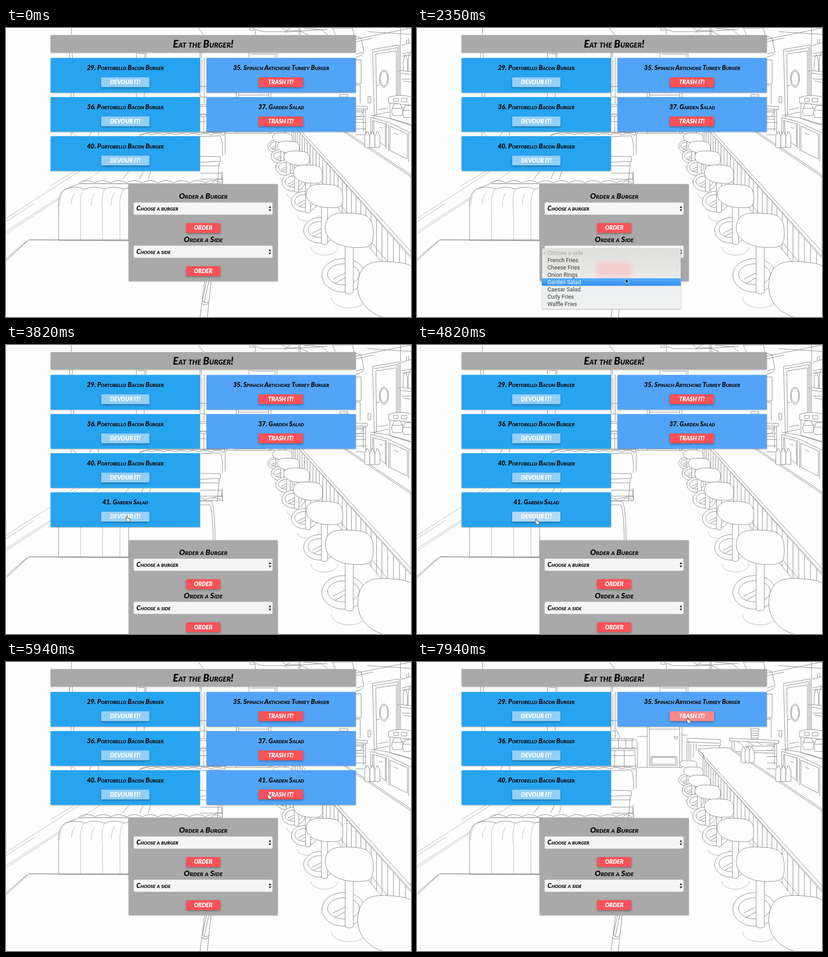
An HTML page that plays this animation: 885 by 633 pixels, repeating every 8000 ms.

```html
<!DOCTYPE html>
<html lang="en">
<head>
<meta charset="utf-8">
<title>Eat the Burger!</title>
<style>
  html, body { margin: 0; width: 100%; height: 100%; overflow: hidden; background: #fefefe; }
  svg { display: block; width: 885px; height: 633px; }
  #scene { fill: none; stroke: #828282; stroke-width: 1; stroke-linejoin: round; }
  #scene .solid { fill: #fefefe; }
  #scene .faint { stroke: #b4b4b4; }
  .hand { font-family: Lato, "Open Sans", sans-serif; font-style: italic; font-weight: 900; font-variant: small-caps; }
  .mid { text-anchor: middle; }
  .menu { font: 12.4px Roboto, Inter, sans-serif; }
  .card { filter: drop-shadow(0 1px 1px rgba(0,0,0,.35)); }
  .button { filter: drop-shadow(0 2px 2px rgba(0,0,0,.35)); }
</style>
</head>
<body>
<svg viewBox="0 0 885 633">
  <defs>
    <linearGradient id="paper" x2="0" y2="1">
      <stop stop-color="#dededc"/><stop offset=".3" stop-color="#e6e6e4"/>
      <stop offset=".65" stop-color="#eeeff0"/><stop offset="1" stop-color="#f0f1f1"/>
    </linearGradient>
    <linearGradient id="pick" x2="0" y2="1">
      <stop stop-color="#55aaf8"/><stop offset="1" stop-color="#3390ee"/>
    </linearGradient>
    <filter id="blur" x="-40%" y="-60%" width="180%" height="220%"><feGaussianBlur stdDeviation="6"/></filter>
  </defs>
  <g id="scene"></g>
  <g id="app"></g>
</svg>
<script>
const LOOP = 8000;
const BLUE = '#27a4f0', SKY = '#52a4f8', RED = '#fb5157', PALE = '#93cff8', GREY = '#a9a9a9';
const scene = document.getElementById('scene'), app = document.getElementById('app');

const path = (d, cls = '') => `<path class="${cls}" d="${d}"/>`;
const rect = (x, y, w, h, fill, extra = '') =>
  `<rect x="${x}" y="${y}" width="${w}" height="${h}" fill="${fill}" ${extra}/>`;
const ellipse = (x, y, rx, ry) => `<ellipse class="solid" cx="${x}" cy="${y}" rx="${rx}" ry="${ry}"/>`;
const text = (x, y, size, str, fill = '#0c0c0c', cls = 'hand mid') =>
  `<text x="${x}" y="${y}" font-size="${size}" fill="${fill}" class="${cls}">${str}</text>`;
const clamp = v => Math.max(0, Math.min(1, v));
const smooth = v => v * v * (3 - 2 * v);

// ---- Diner line drawing ----
function scallops(x0, x1, y, count, rise) {
  const step = (x1 - x0) / count;
  return path(`M${x0} ${y}` + `q${step / 2} ${-rise} ${step} 0`.repeat(count));
}

function stool([x, y, w, h]) {
  const ringX = x - .12 * w, ringY = y + .94 * w, baseY = y + 1.4 * w, post = .085 * w;
  return path(`M${x - .37 * w} ${baseY}a${.37 * w} ${.22 * w} 0 0 0 ${.74 * w} 0`, 'solid faint')
    + ellipse(ringX, ringY, .45 * w, .35 * w)
    + ellipse(ringX, ringY - .02 * w, .33 * w, .22 * w)
    + path(`M${x - post} ${y}V${baseY - .1 * w}q${post} ${.06 * w} ${2 * post} 0V${y}Z`, 'solid')
    + path(`M${x - .34 * w} ${ringY + .08 * w}L${x - post} ${ringY - .05 * w}M${x - .3 * w} ${ringY + .17 * w}L${x - post} ${ringY + .05 * w}`)
    + path(`M${x - w / 2} ${y - .08 * h}C${x - .48 * w} ${y - .55 * h} ${x - .2 * w} ${y - .52 * h} ${x + .12 * w} ${y - .49 * h}`
      + `S${x + .5 * w} ${y - .3 * h} ${x + w / 2} ${y + .12 * h}S${x + .35 * w} ${y + h / 2} ${x + .1 * w} ${y + h / 2}`
      + `S${x - w / 2} ${y + .32 * h} ${x - w / 2} ${y - .08 * h}Z`, 'solid');
}

function bottle(x, y) {
  return path(`M${x} ${y}v-24q1 -4 3 -5l1 -5h3l1 5q3 1 3 5v24q-5 3 -11 0Z`, 'solid');
}

function coffeePot(x, y) {
  return path(`M${x} ${y}l3 -8h13l4 8q5 9 -1 18h-18q-6 -9 -1 -18ZM${x + 20} ${y}q11 2 5 17M${x - 1} ${y + 2}h21`, 'solid');
}

function drawScene() {
  const edge = x => 215 + (x - 630) * 1.12;
  let slats = '';
  for (let x = 629, gap = 4; x < 885; x += gap, gap += .35) {
    slats += `M${x} ${edge(x) + 3}V${edge(x) + 52 + (x - 629) * .18}`;
  }
  const ceiling = path('M143 0V15M139 54V66M145 54V65M285 54V66M289 56H303V65M306 54V65M420 0L432 15M424 54V65M427 54V65'
    + 'M531 54V65M535 57H588V65M592 54V65M533 0V5H545V15M537 0L560 8H610L622 0M603 0L612 6H640L660 15M650 0L690 4L703 15'
    + 'M608 9L702 3M640 0V15M643 0V15M720 15L713 0H757L764 32M764 18L776 22L782 52Q780 61 764 64M765 57L779 53'
    + 'M762 25L885 0M765 30L802 22M790 8L885 14M764 70H776V122H764M764 125H774V166M791 150H797V164H791Z');
  const entrance = path('M424 65V142M428 70V140M433 65V166M424 128H438M424 142V151M503 142V231M508 142V229M574 142V231M579 142V230'
    + 'M511 207H568V227H511ZM514 209H565V224H514ZM482 231H580M508 147H574M560 164H570M482 163H503M579 160H591'
    + 'M142 142V151M148 142V151M285 142V151M302 142V151M142 228V237M145 228L153 237M186 228L182 237M202 228V236')
    + ellipse(566, 166, 3, 3);
  const farBooths = path('M424 168H470Q479 168 481 176L482 232M424 172H475M440 168V190M456 168V190M470 169V190'
    + 'M424 190H478M424 194H476L478 232M432 194V230M453 194V230M424 205H475M424 151H438M438 151L444 168M424 228H480', 'solid')
    + scallops(424, 480, 190, 4, 5);
  const station = path('M590 168L600 167L663 170V183H615M590 168V214M594 172V214M590 175L661 178M598 178V214M604 178V210M610 178V195'
    + 'M661 183V190M729 146H747L745 170H731ZM729 151H747M730 156H746M730 161H746M731 166H745M683 167L790 172V178L684 173Z'
    + 'M688 174V199M693 174V192M781 178V226M786 178V232M718 184H780L775 194H724ZM693 196L781 200M765 181H785M764 207H787M765 221H786'
    + 'M764 194H784M764 234H784M700 174L713 183M722 174L735 183M742 174L755 183', 'solid');
  const doorRight = path('M801 47L859 37V150M801 47L805 198M804 52L856 43V150M808 57L853 50V150M808 57L810 191M804 191L837 184'
    + 'M813 179L835 175M817 125L808 127M855 94H860') + ellipse(826, 111, 10, 19) + ellipse(826, 111, 8, 16);
  const shelves = path('M862 0V150M865 57L885 52M865 62L885 59M862 93L885 96M862 99L885 102M868 93V72L871 60H874L877 72V94M879 95V69L882 55H885'
    + 'M864 38L885 32M875 25V35M880 23V33M865 112H885M868 116L885 119');
  const backBar = path('M797 191L835 197L885 213M797 196L835 206L885 230M797 196V239M801 201V235M831 208V265M836 211V270M880 230V293'
    + 'M803 203L829 210V260L805 240ZM839 215L877 232V287L839 268ZM816 217L823 220M848 230L857 234'
    + 'M836 152Q860 144 885 151M836 152V164L885 169M839 165V198L885 211M847 154H857V161H847ZM864 154H876V162H864Z', 'solid')
    + coffeePot(845, 174) + coffeePot(869, 178);

  const counter = path('M614 191L650 188H684L885 322V500L629 215L625 202Z', 'solid')
    + path('M614 191L885 490M614 191L617 201L885 504M625 204V265M684 191L885 326')
    + path(slats) + path('M628 265L760 422L885 575M634 281L885 593')
    + [708, 717, 726].map(x => bottle(x, 220)).join('') + [784, 795, 806].map(x => bottle(x, 261)).join('');

  const booths = path('M0 417L160 314M0 424L62 384M0 446L205 314M0 451L130 365M97 345L150 314M0 380V410', 'faint')
    + path('M268 314L255 331M300 314L292 331M316 314L311 331M424 238L468 236Q474 246 473 280M424 281L468 282L469 292L424 294'
      + 'M424 302H466M466 293L462 342M472 237L479 232V277M160 341H473L470 315M473 341V314M424 342H448Q456 348 457 430'
      + 'M424 350H445Q452 361 453 430M447 342L460 331H472M290 237L310 229H472M424 331H472M424 318H469')
    + scallops(160, 470, 339, 9, 10) + scallops(292, 474, 234, 7, 6)
    + path('M115 465V402Q112 360 130 353L160 341H268V465Z', 'solid')
    + scallops(130, 300, 353, 4, 9)
    + path('M130 353Q118 362 117 390M172 353Q160 361 163 400V465M215 353Q207 368 211 405V465M258 353Q247 363 249 401V465'
      + 'M151 361Q143 370 143 385M194 361Q187 370 186 390M237 361Q230 370 230 388', 'faint')
    + path('M0 510L50 464H268M50 464L268 466M0 506L46 466')
    + path('M434 555L424 633M448 555L440 633M438 555L429 598M443 555L433 602M429 598Q437 606 444 598M427 603Q435 610 443 603');

  const stools = [[593, 224, 37, 16], [604, 241, 43, 22], [617, 261, 48, 26], [635, 285, 56, 31],
    [660, 320, 64, 40], [696, 368, 80, 51], [750, 443, 105, 75], [838, 575, 139, 126]];
  scene.innerHTML = ceiling + entrance + farBooths + station + doorRight + shelves + backBar + counter + booths
    + stools.map(stool).join('');
}

// ---- Timed interface ----
const MENU_OPEN = 1290, MENU_CLOSE = 2560, ORDERED = 3400, DEVOURED = 4940, TRASHED_41 = 6480, TRASHED_37 = 7300;
const sides = ['Choose a side', 'French Fries', 'Cheese Fries', 'Onion Rings', 'Garden Salad', 'Caesar Salad', 'Curly Fries', 'Waffle Fries'];
const hovers = {
  order: [[680, 960], [2590, ORDERED]],
  devour41: [[3790, DEVOURED]],
  trash41: [[6180, TRASHED_41]],
  trash37: [[6850, TRASHED_37]],
  trash35: [[7740, LOOP]],
};
// time, x, y of the pointer tip
const route = [[470, 438, 590], [800, 446, 530], [1240, 577, 488], [1590, 578, 495], [1820, 578, 495], [2350, 456, 549],
  [2560, 446, 531], [3000, 446, 531], [3240, 443, 528], [3360, 443, 528], [3820, 264, 374], [4120, 260, 380], [4940, 260, 380],
  [5180, 262, 345], [5300, 266, 342], [5940, 573, 287], [6500, 573, 287], [6900, 583, 201], [7320, 583, 201], [7800, 591, 121], [LOOP, 591, 121]];

function hoverLevel(name, t) {
  const span = (hovers[name] || []).find(([from, to]) => t >= from && t < to);
  return span ? clamp((t - span[0]) / 150) : 0;
}

function button(cx, y, w, label, fill, hover = 0) {
  return rect(cx - w / 2, y, w, 21.5, fill, 'rx="1.5" class="button"')
    + rect(cx - w / 2, y, w, 21.5, '#f0eeee', `rx="1.5" opacity="${hover * .35}"`)
    + text(cx, y + 15.2, 12.6, label, '#fff');
}

function card(row, id, name, eaten, t) {
  const x = eaten ? 438 : 97.5, y = 65.5 + row * 85.75, cx = x + 163.2;
  return rect(x, y, 326.5, 76, eaten ? SKY : BLUE, 'rx="1.5" class="card"')
    + text(cx, y + 26.5, 14, `${id}. ${name}`)
    + (eaten ? button(cx - .5, y + 42.5, 97, 'TRASH IT!', RED, hoverLevel('trash' + id, t))
      : button(cx, y + 42.5, 105.5, 'DEVOUR IT!', PALE, hoverLevel('devour' + id, t)));
}

function select(y, label) {
  return rect(279, y, 303.5, 26.5, '#f5f5f5', 'rx="3"') + text(285, y + 18, 14, label, '#0c0c0c', 'hand')
    + `<path fill="#222" d="M574 ${y + 12}l2.7 -4.5l2.7 4.5zM574 ${y + 15}l2.7 4.5l2.7 -4.5z"/>`;
}

function panel(y, side, t) {
  return rect(268, y, 326, 212.5, GREY, 'rx="1.5" class="card"')
    + text(431, y + 32.5, 17, 'Order a Burger') + select(y + 40.5, 'Choose a burger')
    + button(431, y + 85.5, 74.5, 'ORDER', RED)
    + text(431, y + 127, 17, 'Order a Side') + select(y + 135, side)
    + button(431, y + 180, 74.5, 'ORDER', RED, hoverLevel('order', t));
}

function menu(pointerY) {
  const active = Math.floor((pointerY - 484.5) / 16);
  const rows = sides.map((label, i) => {
    const y = 484.7 + i * 16, picked = i > 0 && i === active;
    return (picked ? rect(273, y - .5, 303.5, 16.5, 'url(#pick)') : '')
      + text(285, y + 12.3, 12.4, label, picked ? '#fff' : i ? '#3c3c3c' : '#a9a9a9', 'menu');
  });
  return rect(273, 482.5, 303.5, 132.5, 'url(#paper)', 'rx="2" class="card"')
    + rect(390, 512, 80, 34, '#f4cfcf', 'rx="12" filter="url(#blur)"')
    + rows.join('') + '<path d="M276 493l2 2.5l3.5 -6" fill="none" stroke="#a9a9a9"/>';
}

function pointerAt(t) {
  const next = route.findIndex(([time]) => time > t);
  if (next < 1) return null;
  const [t0, x0, y0] = route[next - 1], [t1, x1, y1] = route[next];
  const k = smooth((t - t0) / (t1 - t0));
  return { x: x0 + (x1 - x0) * k, y: y0 + (y1 - y0) * k };
}

function cursor({ x, y }, isHand) {
  const shape = isHand
    ? '<path fill="#fff" stroke="#222" stroke-width=".8" d="M-1 1q1 -2 2 0v4q2 -1 2 1q2 -1 2 1q2 -1 2 1v3l-1 2H1L-2 8q0 -2 1 -1z"/>'
    : '<path fill="#111" stroke="#fff" stroke-width=".8" d="M0 0V10L2.3 8L4 12L5.7 11.2L4 7.4H7.2Z"/>';
  return `<g transform="translate(${x} ${y})">${shape}</g>`;
}

function render(t) {
  const pointer = pointerAt(t);
  const menuOpen = t >= MENU_OPEN && t < MENU_CLOSE;
  const waiting = t >= ORDERED && t < DEVOURED;
  const overButton = Object.values(hovers).flat().some(([from, to]) => t >= from && t < to) || (t >= 5800 && t < 6180);
  const salad = 'Garden Salad', portobello = 'Portobello Bacon Burger';
  app.innerHTML = rect(97.5, 15.5, 667, 38, GREY, 'rx="1" class="card"') + text(431, 43, 22, 'Eat the Burger!')
    + [29, 36, 40].map((id, row) => card(row, id, portobello, false, t)).join('')
    + card(0, 35, 'Spinach Artichoke Turkey Burger', true, t)
    + (t < TRASHED_37 ? card(1, 37, salad, true, t) : '')
    + (waiting ? card(3, 41, salad, false, t) : '')
    + (t >= DEVOURED && t < TRASHED_41 ? card(2, 41, salad, true, t) : '')
    + panel(waiting ? 427.5 : 341.75, t >= MENU_CLOSE && t < ORDERED ? salad : 'Choose a side', t)
    + (menuOpen ? menu(pointer.y) : '')
    + (pointer ? cursor(pointer, overButton) : '');
}

drawScene();
const start = performance.now();
function frame() {
  render((performance.now() - start) % LOOP);
  requestAnimationFrame(frame);
}
frame();
</script>
</body>
</html>
```
